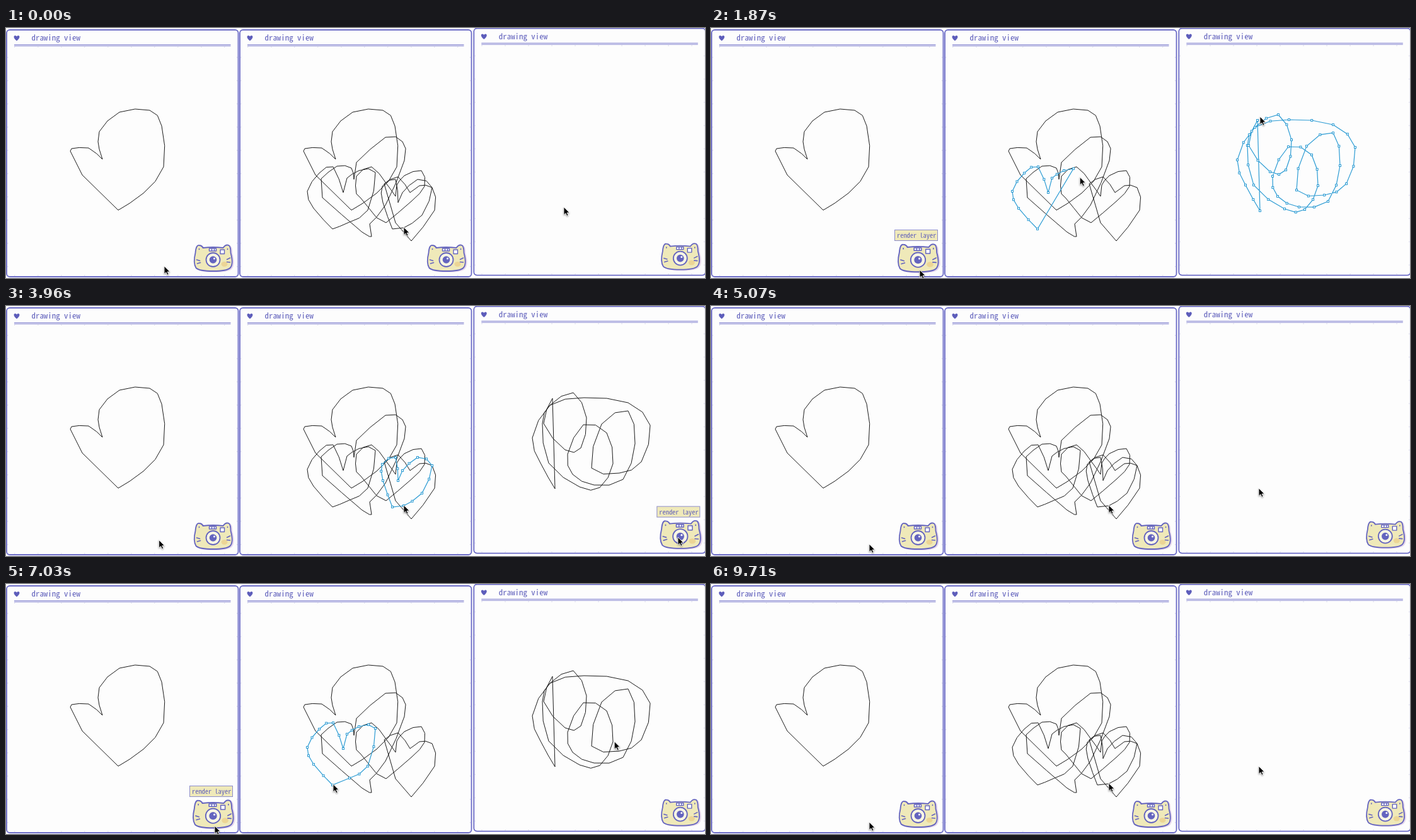
These frames come from a looping animation (1109x398 px, 9.81 s). An HTML page:

```html
<!DOCTYPE html>
<html lang="en">
<head>
<meta charset="utf-8">
<title>Drawing view</title>
<style>
html, body { margin: 0; width: 100%; height: 100%; overflow: hidden; background: #fff; }
svg { display: block; width: 1109px; height: 398px; }
text { font-family: "Noto Sans Mono CJK JP", "Noto Sans Mono CJK SC", "Noto Sans Mono", monospace; fill: #5d5dbb; }
.ink { fill: none; stroke: #1a1a1a; stroke-width: 1; }
.live { stroke: #2b9bd3; stroke-width: 1.2; marker: url(#node); }
</style>
</head>
<body>
<svg id="stage" viewBox="0 0 1109 398">
  <defs>
    <marker id="node" markerUnits="userSpaceOnUse" markerWidth="6" markerHeight="6" refX="3" refY="3">
      <rect x="1.5" y="1.5" width="3" height="3" fill="#fff" stroke="#2b9bd3"/>
    </marker>
    <path id="body" d="M-28-8Q-27-21-22-20Q-18-20-16-16Q0-18 16-16Q20-22 25-20Q28-18 28-8Q33 10 27 16Q22 21 0 21Q-22 21-27 16Q-32 8-28-8Z"/>
    <g id="camera" stroke="#6464bf" stroke-width="1.8" stroke-linecap="round" stroke-linejoin="round">
      <use href="#body" x="2" y="1" fill="#e6d8ec" stroke="#e6d8ec"/>
      <use href="#body" fill="#efe9b9"/>
      <ellipse cx="18" cy="10" rx="5" ry="4" fill="#ecd596" stroke="none"/>
      <g fill="#fff" stroke-width="1.4">
        <path d="M-6-15H5v4H-6ZM-2-15v4M2-15v4"/>
        <path d="M11.500-13H18v6.500H11.500Z"/>
      </g>
      <circle cy="3" r="11" fill="#f8f6e4"/>
      <circle cy="3" r="5.800" fill="#6464bf" stroke="none"/>
      <circle cx="2" cy="1" r="1.500" fill="#fff" stroke="none"/>
      <path d="M-26 3l5 1.500M-25 9l5-1.500M27 0l-5 2.500M27 7l-5-.5M-22-14.500v1M23-14.500v1" fill="none" stroke-width="1.600"/>
    </g>
    <g id="label">
      <rect x="291.5" y="321.500" width="68" height="17" fill="#efe9b9" stroke="#8d8dcb"/>
      <text x="295" y="334" font-size="10.4">render layer</text>
    </g>
    <g id="frame">
      <rect x="1" y="3" width="367.5" height="393" rx="5" fill="#fdfdfd" stroke="#6a6ac6" stroke-width="1.800"/>
      <path d="M13 30.500H357M13 394H357M3 46V390M366.500 46V390" fill="none" stroke="#cfcfe6" stroke-dasharray="1.500 35.500"/>
      <path d="M13 26.500H356.500M13 28.500H356.500" stroke="#8080cf"/>
      <path d="M17 20.500C11 16 12 12 14.500 12Q16.500 12 17 13.500Q17.500 12 19.500 12C22 12 23 16 17 20.500Z" fill="#5d5dbb"/>
      <text x="40.500" y="20" font-size="12.900">drawing view</text>
    </g>
    <path id="arrow" d="M0-1V11.500L2.900 8.900L5 13.300L7.100 12.300L5.100 8.100H9Z" fill="#000" stroke="#fff" stroke-width=".9"
      style="filter:drop-shadow(0 1px 1px #0006)"/>
  </defs>
</svg>
<script>
const LOOP = 9810, stage = document.getElementById('stage');

// Key points of each sketch; a bar marks a sharp corner.
const bigHeart = '102,196 | 104,192 131,191 153,209 | 148,193 148,165 180,134 228,131 247,156 250,221 218,263 178,290 | 121,234';
const leanHeart = '500,240 525,220 548,223 552,241 | 556,214 602,174 629,181 632,211 602,282 577,312 | 580,332 565,325 502,270';
const wideHeart = '556,264 556,236 580,221 603,247 618,268 | 620,250 632,235 659,227 664,252 643,276 603,310 | 588,302 563,271';
const lowHeart = '600,248 622,237 641,262 | 656,251 676,254 680,290 643,339 | 618,310';
const firstHeart = '518,320 488,287 478,260 497,231 519,221 535,262 | 541,239 560,227 586,230 574,290 545,309 518,320';
const lastHeart = '613,320 598,278 597,252 618,241 622,278 | 629,262 653,241 676,254 660,298 631,318';
const scribble = '871,291 848,250 835,210 863,158 917,146 987,154 1022,190 1008,248 973,266 929,258 945,188 987,167 998,219 979,276 933,285 899,268 891,236 916,189 953,202 963,251 942,289 910,288 861,250 851,187 863,158 900,138 921,178 912,226 887,229 853,187 867,147';

const clamp = v => Math.min(1, Math.max(0, v));
const ease = u => u * u * (3 - 2 * u);
const mix = (a, b, u) => a.map((v, k) => v + (b[k] - v) * u);

// Four-point rule: one curved midpoint between each pair of keys.
function bend(run) {
  const p = run.trim().split(' ').map(s => s.split(',').map(Number));
  return p.flatMap((b, i) => {
    const c = p[i + 1];
    if (!c) return [b];
    const a = p[i - 1] || b, d = p[i + 2] || c;
    return [b, b.map((v, k) => (9 * (v + c[k]) - a[k] - d[k]) / 16)];
  });
}
const trace = keys => keys.split('|').flatMap(bend);

function add(tag, attrs) {
  const el = document.createElementNS('http://www.w3.org/2000/svg', tag);
  for (const k in attrs) el.setAttribute(k, attrs[k]);
  return stage.appendChild(el);
}
const show = (el, on) => el.setAttribute('visibility', on ? 'visible' : 'hidden');
const ink = (keys, x = 0) => add('polygon', { points: trace(keys).join(' '), class: 'ink', transform: `translate(${x} 0)` });

// A pen stroke: nodes trail the pointer, then turn to ink on release.
function stroke(keys, start, end, release) {
  const pts = trace(keys), el = ink(keys);
  const index = t => clamp((t - start) / (end - start)) * (pts.length - 1);
  return {
    start, end,
    active: t => t >= start && t < release,
    at(t) {
      const i = index(t), n = Math.floor(i);
      return mix(pts[n], pts[n + 1] || pts[n], i - n);
    },
    draw(t, on) {
      const live = this.active(t);
      const shown = live && t < end ? Math.max(1, Math.floor(index(t))) : pts.length;
      show(el, on);
      el.setAttribute('class', live ? 'ink live' : 'ink');
      el.setAttribute('points', pts.slice(0, shown).join(' '));
    }
  };
}

// Moves are [start, end, x, y], each eased on from the pointer's last place.
function panel(x, y, period, home, moves) {
  add('use', { href: '#frame', x, y });
  const camera = add('use', { href: '#camera' });
  const label = add('use', { href: '#label', x, y });
  const pointer = t => moves.reduce((at, [from, to, ...place]) =>
    mix(at, place, ease(clamp((t - from) / (to - from)))), home);
  return {
    period, strokes: [],
    draw(t, hover = false, turn = 0) {
      const pen = this.strokes.find(s => s.active(t));
      show(camera, !pen);
      show(label, hover);
      camera.setAttribute('transform',
        `translate(${x + 328.5} ${y + 366}) rotate(${turn}) scale(${hover ? 1.06 : 1})`);
      const place = pen && t < pen.end ? pen.at(t) : pointer(t);
      this.arrow.setAttribute('transform', `translate(${place})`);
    }
  };
}

const left = panel(0, 0, LOOP / 2, [251, 380], [
  [300, 900, 294, 300], [1260, 1700, 331, 386], [2150, 2850, 203, 343], [3300, 4200, 251, 380]]);
const middle = panel(370, 0, LOOP / 2, [631, 318], [
  [850, 1180, 518, 320], [2200, 2850, 613, 320], [3120, 3930, 631, 318]]);
const right = panel(741.3, -2.4, 4740, [885, 286], [
  [0, 200, 869, 291], [430, 1711, 871, 142], [1900, 2700, 1066, 369]]);

ink(bigHeart);
ink(bigHeart, 370);
[leanHeart, wideHeart, lowHeart].forEach(h => ink(h));
middle.strokes = [stroke(firstHeart, 1177, 2130, 2200), stroke(lastHeart, 3120, 3930, 4000)];
right.strokes = [stroke(scribble, 430, 1711, 1900)];
for (const p of [left, middle, right]) p.arrow = add('use', { href: '#arrow' });

function render(now) {
  const t = now % LOOP, a = t % left.period, b = t % right.period;
  left.draw(a, a > 1560 && a < 2300);
  middle.draw(a);
  for (const s of middle.strokes) s.draw(a, a < 850 || a >= s.start);
  right.draw(b, b > 2560, clamp((b - 2887) / 440) * 360);
  right.strokes[0].draw(b, b >= 430);
}

const began = performance.now();
function tick() {
  render(performance.now() - began);
  requestAnimationFrame(tick);
}
tick();
</script>
</body>
</html>
```
